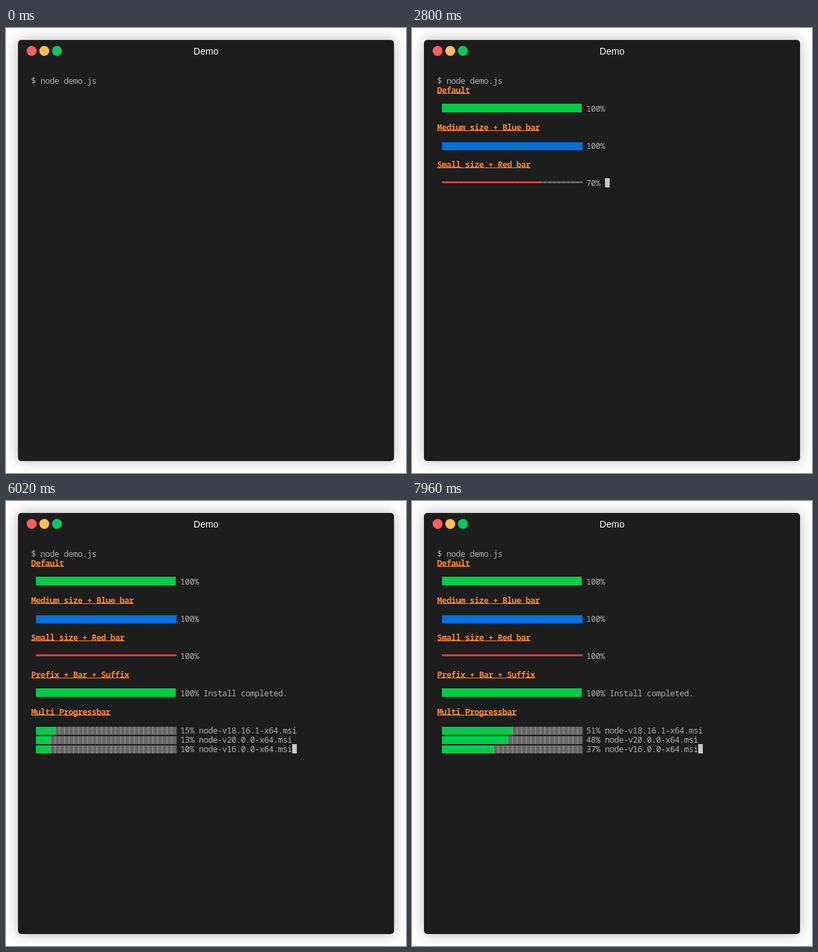
Recreate the animation shown at these times as an HTML page with a canvas. Size 601x670 px, loop 8 s.

```html
<!DOCTYPE html>
<html lang="en">
<head>
<meta charset="utf-8">
<title>Demo</title>
<style>
  html, body { margin: 0; width: 100%; height: 100%; overflow: hidden; background: #fff; }
  canvas { display: block; }
</style>
</head>
<body>
<canvas id="stage" width="601" height="670"></canvas>
<script>
const ctx = document.getElementById('stage').getContext('2d');
const LOOP = 8000, CELL = 7, ROW = 14, LEFT = 38, TOP = 72, CELLS = 30;
const FG = '#afafaf', GREEN = '#00cc4a', BLUE = '#0072db', RED = '#ff4136', ORANGE = '#ff8533';
// Glyph box of each bar style: top offset, height, width
const FULL = [0, 13, 7], MEDIUM = [2, 12, 8.43], SMALL = [5, 2.5, 8.43];
const PACKAGES = ['', 'react', 'vite', 'webpack', 'eslint'];
const DOWNLOADS = [
  { file: 'node-v18.16.1-x64.msi', tick: 205, marks: [0, 15, 46, 51] },
  { file: 'node-v20.0.0-x64.msi', tick: 208, marks: [0, 13, 42, 48] },
  { file: 'node-v16.0.0-x64.msi', tick: 210, marks: [0, 10, 33, 37] },
];
const TICKS = [0, 2, 8, 11];

function rect(color, x, y, w, h) {
  ctx.fillStyle = color;
  ctx.fillRect(x, y, w, h);
}

function print(text, col, row, color = FG, weight = 'normal') {
  ctx.font = `${weight} 12.5px "Noto Sans Mono", "DejaVu Sans Mono", monospace`;
  ctx.letterSpacing = '-0.5px';
  ctx.textAlign = 'left';
  ctx.fillStyle = color;
  ctx.fillText(text, LEFT + col * CELL - 0.25, TOP + row * ROW + 12);
  return col + text.length;
}

function heading(text, row) {
  print(text, 0, row, ORANGE, 'bold');
  rect(ORANGE, LEFT, TOP + row * ROW + 12, text.length * CELL, 1);
}

function cursor(col, row) {
  rect('#c7c7c7', LEFT + col * CELL, TOP + row * ROW, CELL, ROW);
}

// Draws prefix, bar, percentage and suffix; returns the column after them
function progress(row, percent, color, [dy, h, w], prefix = '', suffix = '') {
  const start = print(prefix + ' ', 0, row);
  const filled = Math.floor(percent * CELLS / 100);
  for (let i = 0; i < CELLS; i++) {
    ctx.globalAlpha = i < filled ? 1 : 0.5;
    rect(i < filled ? color : FG, LEFT + (start + i) * CELL, TOP + row * ROW + dy, w, h);
  }
  ctx.globalAlpha = 1;
  return print(`${percent}% ${suffix}`, start + CELLS + 1, row);
}

function frame() {
  rect('#fff', 0, 0, 601, 670);
  ctx.save();
  ctx.shadowColor = 'rgba(0,0,0,.3)';
  ctx.shadowBlur = 19;
  ctx.fillStyle = '#1d1d1d';
  ctx.beginPath();
  ctx.roundRect(18, 18, 565, 634, 5);
  ctx.fill();
  ctx.restore();
  ['#ff5c5c', '#ffbd55', '#00c95f'].forEach((color, i) => {
    ctx.fillStyle = color;
    ctx.beginPath();
    ctx.arc(38.5 + 19 * i, 34.5, 7.5, 0, 2 * Math.PI);
    ctx.fill();
  });
  ctx.font = '14px "Liberation Sans", Arial, sans-serif';
  ctx.letterSpacing = '0px';
  ctx.textAlign = 'center';
  ctx.fillStyle = '#fff';
  ctx.fillText('Demo', 300.5, 40);
}

function downloaded({ tick, marks }, elapsed) {
  const n = Math.min(Math.floor(elapsed / tick), 11);
  const k = n < 2 ? 0 : n < 8 ? 1 : 2;
  const part = (n - TICKS[k]) / (TICKS[k + 1] - TICKS[k]);
  return Math.round(marks[k] + part * (marks[k + 1] - marks[k]));
}

function draw(t) {
  frame();
  print('$ node demo.js', 0, 0);
  let end, row;
  const bars = [
    ['Default', GREEN, FULL],
    ['Medium size + Blue bar', BLUE, MEDIUM],
    ['Small size + Red bar', RED, SMALL],
  ];
  bars.forEach(([title, color, style], i) => {
    const elapsed = t - 100 - 1000 * i;
    if (elapsed < 0) return;
    heading(title, 1 + 4 * i);
    row = 3 + 4 * i;
    end = progress(row, Math.min(Math.floor(elapsed / 100) * 10, 100), color, style);
  });
  if (t >= 3100) {
    heading('Prefix + Bar + Suffix', 13);
    row = 15;
    const step = Math.floor((t - 3100) / 500);
    end = step < 5
      ? progress(row, step * 20, GREEN, FULL, 'Installing npm pkgs', PACKAGES[step])
      : progress(row, 100, GREEN, FULL, '', 'Install completed.');
  }
  if (t >= 5600) {
    heading('Multi Progressbar', 17);
    DOWNLOADS.forEach((item, i) => {
      row = 19 + i;
      end = progress(row, downloaded(item, t - 5600), GREEN, MEDIUM, '', item.file);
    });
  }
  if (row) cursor(end, row);
}

let start;
function loop(now) {
  start ??= now;
  draw((now - start) % LOOP);
  requestAnimationFrame(loop);
}
requestAnimationFrame(loop);
</script>
</body>
</html>
```
